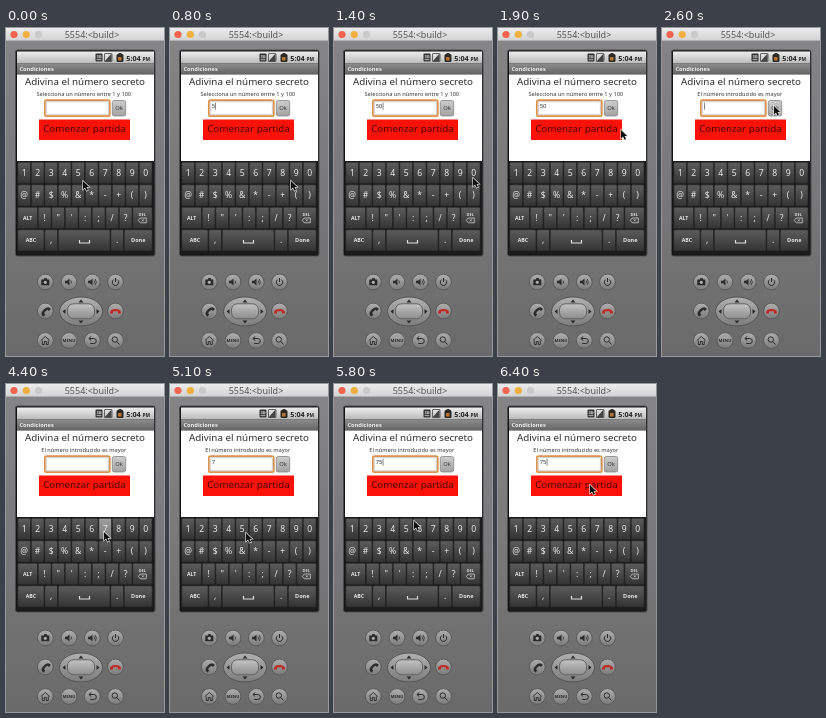
Recreate the animation shown at these times as an HTML page with a canvas. Size 158x328 px, loop 6.5 s.

```html
<!DOCTYPE html>
<html lang="es">
<head>
<meta charset="utf-8">
<style>
html, body { margin: 0; width: 100%; height: 100%; overflow: hidden; background: #787778; }
canvas { display: block; width: 158px; height: 328px; }
</style>
</head>
<body>
<canvas id="stage"></canvas>
<script>
const W = 158, H = 328, LOOP = 6500, STEP = 100;
const SANS = '"Noto Sans", "Open Sans", sans-serif';
const canvas = document.getElementById('stage');
const ratio = window.devicePixelRatio || 1;
canvas.width = W * ratio;
canvas.height = H * ratio;
const ctx = canvas.getContext('2d');
ctx.scale(ratio, ratio);

// Pointer waypoints: time, x, y
const route = [
  [0, 77, 153], [500, 77, 153], [800, 121, 153], [1000, 139, 150], [1400, 139, 150],
  [1900, 123, 102], [2200, 112, 78], [3500, 112, 78], [4200, 98, 148], [4700, 98, 148],
  [5000, 76, 149], [5600, 76, 149], [6400, 92, 101], [6500, 94, 98]
];
// Contents of the input field
const entries = [[-600, ''], [600, '5'], [1300, '50'], [2600, ''], [4600, '7'], [5400, '75']];
const PRESS = 200;

function shade(y, h, top, bottom) {
  const g = ctx.createLinearGradient(0, y, 0, y + h);
  g.addColorStop(0, top);
  g.addColorStop(1, bottom);
  return g;
}
function box(x, y, w, h, fill, radius = 0, stroke, line = 1) {
  ctx.beginPath();
  ctx.roundRect(x, y, w, h, radius);
  ctx.fillStyle = fill;
  ctx.fill();
  if (stroke) {
    ctx.strokeStyle = stroke;
    ctx.lineWidth = line;
    ctx.stroke();
  }
}
function disc(x, y, rx, fill, stroke, ry = rx) {
  ctx.beginPath();
  ctx.ellipse(x, y, rx, ry, 0, 0, 7);
  ctx.fillStyle = fill;
  ctx.fill();
  if (stroke) {
    ctx.strokeStyle = stroke;
    ctx.lineWidth = 1;
    ctx.stroke();
  }
}
function text(string, x, y, size, color, align = 'center', weight = 400) {
  ctx.font = `${weight} ${size}px ${SANS}`;
  ctx.textAlign = align;
  ctx.fillStyle = color;
  ctx.fillText(string, x, y);
}
function icon(d, x, y, color, line = 0, angle = 0) {
  const path = new Path2D(d);
  ctx.save();
  ctx.translate(x, y);
  ctx.rotate(angle);
  ctx.fillStyle = ctx.strokeStyle = color;
  ctx.lineWidth = line;
  if (line) ctx.stroke(path);
  else ctx.fill(path);
  ctx.restore();
}

function drawWindow() {
  box(0, 0, W, H, shade(14, 314, '#858486', '#6b6a6b'));
  box(0, 0, W, 13, shade(0, 13, '#ececec', '#d2d2d2'));
  box(0, 12.5, W, 0.5, '#8d8d8d');
  disc(8, 6.5, 3.6, '#f4644f');
  disc(20.3, 6.5, 3.6, '#f0b03f');
  disc(32.5, 6.5, 3.6, '#c9c9c9');
  text('5554:<build>', 86, 9.7, 9, '#555');
  box(9.5, 22, 139.5, 206, '#141414', 2, '#4c4b4c');
}

function drawStatus() {
  box(11, 23.5, 137, 12, shade(23.5, 12, '#eeeeee', '#b9b9b9'));
  box(89.5, 25.5, 7, 8, '#333', 1);
  text('3G', 93, 29.6, 4, '#eee', 'center', 700);
  icon('M-2.5 2H2.5M-1 1V3M1 1V3', 93, 29.5, '#bbb', 0.7);
  icon('M0 0V-8L-7 0Z', 105.5, 33.5, '#444');
  box(98.5, 25.5, 7.5, 8, 'transparent', 0.5, '#444', 0.8);
  box(110.5, 26, 7, 8, '#2c2924', 1.5);
  box(112.5, 25, 3, 1.5, '#333');
  box(112, 29, 3.5, 3.5, '#b87532', 0.5);
  text('5:04', 120.3, 32.8, 7.2, '#222', 'left', 700);
  text('PM', 144, 32.8, 4.8, '#222', 'right', 700);
  box(11, 35.5, 137, 11, shade(35.5, 11, '#8d8d8d', '#636363'));
  text('Condiciones', 13.4, 42.6, 5.7, '#eee', 'left', 600);
}

function drawForm(time, entry) {
  box(11, 46.5, 137, 86.5, '#fff');
  text('Adivina el número secreto', 79, 56.8, 9.8, '#2c2c2c');
  const message = time < 2600 ? 'Selecciona un número entre 1 y 100' : 'El número introducido es mayor';
  text(message, 77.8, 68, 5.65, '#333');
  box(38.8, 72.2, 65, 16, '#fff', 2, '#dd9149', 1.7);
  box(40.3, 73.7, 62, 13, '#fff', 1, '#aaa', 0.6);
  text(entry[1], 41.7, 79.7, 5.8, '#333', 'left');
  if ((time - entry[0]) % 1000 < 500) {
    box(42.1 + ctx.measureText(entry[1]).width, 74.8, 0.6, 7, '#333');
  }
  box(106.3, 72.5, 13.4, 15.5, shade(72, 16, '#cfcfcf', '#a2a2a2'), 2, '#858585', 0.8);
  text('Ok', 113, 81.8, 5.8, '#333');
  box(33, 91.5, 91, 20.5, '#fb1208');
  text('Comenzar partida', 78.5, 104.3, 9.8, '#4a0300');
}

function key(label, x, y, w, size = 8.6, weight = 400, pressed = false) {
  const fill = pressed ? shade(y, 22, '#a0a0a0', '#777') : shade(y, 22, '#5e5d5e', '#343334');
  box(x + 0.4, y + 0.6, w - 0.8, 21.2, fill, 1.2, '#222', 0.6);
  text(label, x + w / 2, y + 11 + size * 0.36, size, '#e8e8e8', 'center', weight);
}
function drawKeyboard(time) {
  box(11, 133, 137, 93.5, '#1c1b1c');
  const pitch = 13.5, rows = [133.7, 156.2, 178.7, 201.2];
  const typing = entries.find(([at, value]) => value && at > time && at - time <= PRESS);
  const typed = typing && typing[1].at(-1);
  const keys = (labels, x, y) => [...labels].forEach((c, i) =>
    key(c, x + i * pitch, y, pitch, 8.6, 400, c === typed));
  keys('1234567890', 11.4, rows[0]);
  keys('@#$%&*-+()', 11.4, rows[1]);
  key('ALT', 11.4, rows[2], 20.5, 5.2, 700);
  keys('!"\':;/?', 31.9, rows[2]);
  key('', 126.4, rows[2], 20.2);
  text('DEL', 136.3, 187.6, 4, '#ddd', 'center', 700);
  icon('M-4 0L-2-2.4H4V2.4H-2ZM-.5-1L1.5 1M1.5-1L-.5 1', 136.3, 192.4, '#ddd', 0.7);
  key('ABC', 11.4, rows[3], 27, 5.2, 700);
  key(',', 38.4, rows[3], pitch);
  key('', 51.9, rows[3], 52.5);
  icon('M-5-1.5V1.5H5V-1.5', 78.5, 213.5, '#ddd', 1.2);
  key('.', 104.4, rows[3], pitch);
  key('Done', 117.9, rows[3], 28.7, 5.5, 700);
}

function drawButtons() {
  const columns = [39.3, 63, 86.3, 109.5], ink = '#2b2b2b';
  const button = (x, y) => disc(x, y, 7.9, shade(y - 8, 16, '#b0afb0', '#7b7a7b'), '#5c5b5c');
  for (const x of columns) {
    button(x, 254);
    button(x, 312.5);
  }
  button(39.3, 283);
  button(109.5, 283);

  icon('M-4-2.5H-1.5L-.8-4H1.2L2-2.5H4V3.2H-4Z', 39.3, 254, ink);
  disc(39.3, 254.3, 1.6, '#aaa');
  const speaker = 'M-4-1.2H-2L.5-3.5V3.5L-2 1.2H-4Z';
  icon(speaker, 63, 254, ink);
  icon('M2-1.5Q3 0 2 1.5', 63, 254, ink, 0.8);
  icon(speaker, 86, 254, ink);
  icon('M2-1.5Q3 0 2 1.5M3.2-3Q5.4 0 3.2 3', 86, 254, ink, 0.8);
  icon('M-1.8-2.4A3.2 3.2 0 1 0 1.8-2.4M0-4V0', 109.5, 254, ink, 1);

  const handset = 'M-5.5 2.5Q-6-2 0-2T5.5 2.5H2.5V.6Q0 0-2.5.6V2.5Z';
  icon(handset, 39.3, 283, ink, 0, -Math.PI / 4);
  icon(handset, 109.5, 283, '#c02a24');

  disc(75, 283.5, 21.5, shade(269, 29, '#b2b1b2', '#7d7c7d'), '#555455', 14.5);
  box(61.5, 275.8, 27, 15, shade(276, 15, '#c4c3c4', '#8d8c8d'), 6, '#626162', 1);
  icon('M-2.5-9L0-12L2.5-9ZM-2.5 9L0 12L2.5 9ZM-15.5-2.5L-18.5 0L-15.5 2.5ZM15.5-2.5L18.5 0L15.5 2.5Z', 75, 283.5, ink);

  icon('M-4.5 0L0-4L4.5 0M-3 0V4H-1V1H1V4H3V0', 39.3, 312.5, ink, 0.9);
  text('MENU', 63, 314, 4.2, ink, 'center', 600);
  icon('M-3-2H1.5A2.5 2.5 0 0 1 1.5 3H-2M-1-4L-3.5-2L-1 0', 86.3, 312.5, ink, 1);
  icon('M2-1A2.7 2.7 0 1 1-3.4-1A2.7 2.7 0 1 1 2-1M1.2 1L4 4', 109.5, 312.5, ink, 1);
}

function drawPointer(time) {
  const i = route.findIndex(p => p[0] > time);
  const [t0, x0, y0] = route[i - 1], [t1, x1, y1] = route[i];
  const k = (time - t0) / (t1 - t0);
  const x = x0 + (x1 - x0) * k, y = y0 + (y1 - y0) * k;
  const arrow = 'M0 0V8.4L2 6.6L3.5 9.8L5 9.1L3.6 6H6.2Z';
  icon(arrow, x, y, '#e8e8e8', 1.2);
  icon(arrow, x, y, '#111');
}

function frame(now) {
  const time = Math.floor(now % LOOP / STEP) * STEP;
  const entry = entries.findLast(e => e[0] <= time);
  drawWindow();
  drawStatus();
  drawForm(time, entry);
  drawKeyboard(time);
  drawButtons();
  drawPointer(time);
  requestAnimationFrame(frame);
}
requestAnimationFrame(frame);
</script>
</body>
</html>
```
